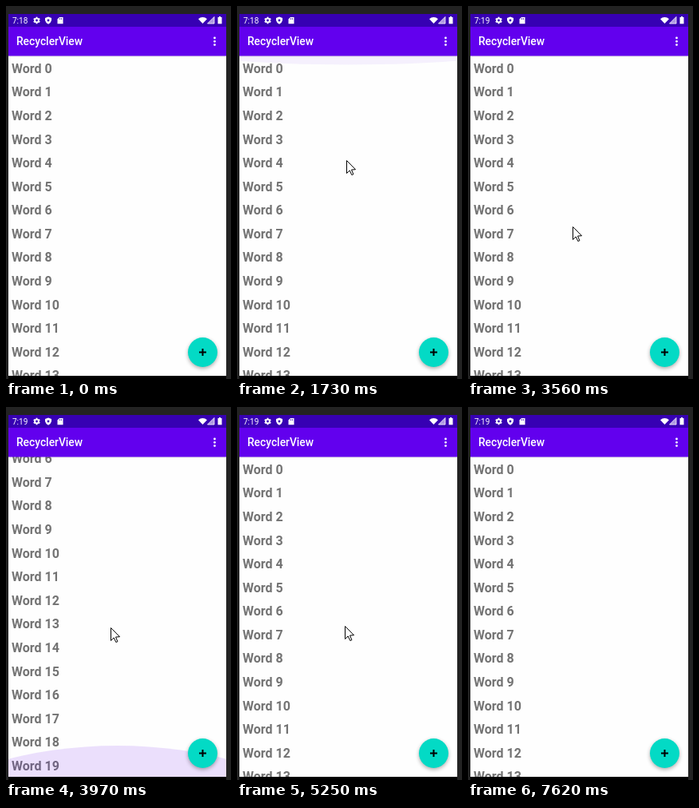
Recreate the animation shown at these times as an HTML page with a canvas. Size 282x467 px, loop 8000 ms.

```html
<!DOCTYPE html>
<html lang="en">
<head>
<meta charset="utf-8">
<title>RecyclerView</title>
<style>
  html, body { margin: 0; width: 100%; height: 100%; overflow: hidden; background: #222; }
  canvas { display: block; width: 282px; height: 467px; }
</style>
</head>
<body>
<canvas id="stage"></canvas>
<script>
const W = 282, H = 467, LOOP = 8000, STEP = 125;
const LEFT = 3, RIGHT = 276, TOP = 62, BOTTOM = 463, WIDTH = RIGHT - LEFT;
const ROW = 29.58, ROWS = 20, MAX_SCROLL = 191, FONT = 'Roboto, sans-serif';

const canvas = document.getElementById('stage');
const ctx = canvas.getContext('2d');
const dpr = window.devicePixelRatio || 1;
canvas.width = W * dpr;
canvas.height = H * dpr;
ctx.scale(dpr, dpr);

// Pointer glides: from, to (ms), then the place reached
const glides = [
  [500, 740, 144, 178], [880, 1730, 137, 193], [1850, 2210, 139, 197],
  [2350, 3140, 131, 270], [3560, 3560, 131, 276], [4470, 4710, 131, 274],
  [4860, 5380, 136, 274], [5680, 5830, 139, 260], [5980, 6220, 279, 443],
  [6510, 6510, 270, 425], [6650, 6650, 242, 319], [7350, 7350, 252, 371],
  [7500, 7500, 252, 425]
];
const visible = [[500, 6370], [6510, 6780], [7350, 7620]];

// List drags: from, to (ms), distance
const drags = [
  [880, 1240, MAX_SCROLL], [1360, 1730, -MAX_SCROLL],
  [3700, 3970, MAX_SCROLL], [4470, 4710, -140], [4860, 5100, 140 - MAX_SCROLL]
];

// Overscroll: growth from, to, fading from, to (ms), depth
const topPulls = [
  [1490, 1490, 2350, 2350, 11], [2350, 2850, 2990, 3140, 34], [5530, 5530, 5680, 5980, 31]
];
const bottomPulls = [[1240, 1240, 1360, 1360, 26], [3970, 3970, 4100, 4220, 39]];

// Progress 0..1 in visible steps; the first step shows at `from`, the last at `to`.
function progress(t, from, to) {
  if (t < from) return 0;
  if (t >= to) return 1;
  const gaps = Math.round((to - from) / STEP);
  return (Math.floor((t - from) / (to - from) * gaps) + 1) / (gaps + 1);
}

const easeOut = p => 1 - (1 - p) ** 2;

const sum = (items, f) => items.reduce((total, item) => total + f(item), 0);

const scrollAt = t => sum(drags, ([a, b, dist]) => dist * easeOut(progress(t, a, b)));

const pullAt = (pulls, t) =>
  sum(pulls, ([a, b, c, d, depth]) => depth * (progress(t, a, b) - progress(t, c, d)));

function pointerAt(t) {
  let x = 268, y = 589;
  for (const [from, to, tx, ty] of glides) {
    const p = progress(t, from, to);
    x += (tx - x) * p;
    y += (ty - y) * p;
  }
  return [Math.round(x), Math.round(y)];
}

function rect(color, x, y, w, h) {
  ctx.fillStyle = color;
  ctx.fillRect(x, y, w, h);
}

function disc(color, x, y, r) {
  ctx.fillStyle = color;
  ctx.beginPath();
  ctx.arc(x, y, r, 0, Math.PI * 2);
  ctx.fill();
}

function poly(color, ...pts) {
  ctx.fillStyle = color;
  ctx.beginPath();
  pts.forEach(([x, y]) => ctx.lineTo(x, y));
  ctx.closePath();
  ctx.fill();
}

function text(str, x, y, font, color) {
  ctx.font = font + ' ' + FONT;
  ctx.fillStyle = color;
  ctx.fillText(str, x, y);
}

function shadow(alpha, blur, dy) {
  ctx.shadowColor = `rgba(0,0,0,${alpha})`;
  ctx.shadowBlur = blur * dpr;
  ctx.shadowOffsetY = dy * dpr;
}

// A wide circle cap, squashed to the current depth
function glow(depth, edge, dir) {
  if (depth < 0.5) return;
  const r = WIDTH * 1.5, cap = r * (1 - Math.cos(Math.PI / 6));
  ctx.save();
  ctx.translate(LEFT + WIDTH / 2, edge);
  ctx.scale(1, dir * depth / cap);
  disc(`rgba(98,0,238,${Math.min(0.12, 0.02 + depth * 0.003)})`, 0, cap - r, r);
  ctx.restore();
}

function list(t) {
  const scroll = scrollAt(t);
  ctx.save();
  ctx.beginPath();
  ctx.rect(LEFT, TOP, WIDTH, BOTTOM - TOP);
  ctx.clip();
  rect('#fefefe', LEFT, TOP, WIDTH, BOTTOM - TOP);
  for (let i = 0; i < ROWS; i++) {
    text('Word ' + i, 7, Math.round(83.8 + i * ROW - scroll), 'bold 16px', '#737373');
  }
  glow(pullAt(topPulls, t), TOP + 0.5, 1);
  glow(pullAt(bottomPulls, t), BOTTOM, -1);
  ctx.restore();
}

function gear(x, y) {
  ctx.strokeStyle = '#fff';
  ctx.lineWidth = 2;
  for (let i = 0; i < 3; i++) {
    const a = i * Math.PI / 3 + Math.PI / 6, dx = 4.3 * Math.cos(a), dy = 4.3 * Math.sin(a);
    ctx.beginPath();
    ctx.moveTo(x - dx, y - dy);
    ctx.lineTo(x + dx, y + dy);
    ctx.stroke();
  }
  disc('#fff', x, y, 3.3);
  disc('#3700b3', x, y, 1.4);
}

function statusBar(t) {
  rect('#3700b3', LEFT, 10, WIDTH, 16);
  text(t < 2210 ? '7:18' : '7:19', 8, 21.5, '10px', '#fff');
  gear(38.5, 18);
  poly('#fff', [53, 13.5], [57, 15], [57, 18], [55.5, 21], [53, 22.8], [50.5, 21], [49, 18], [49, 15]);
  disc('#3700b3', 53, 18, 1.4);
  poly('#fff', [67, 14], [71.5, 14], [71.5, 22.3], [64.5, 22.3], [64.5, 16.5]);
  for (const x of [67, 69]) rect('#3700b3', x, 15.2, 0.8, 1.8);

  ctx.fillStyle = '#fff';
  ctx.beginPath();
  ctx.moveTo(246.5, 22);
  ctx.arc(246.5, 22, 8, -Math.PI * 0.74, -Math.PI * 0.26);
  ctx.fill();
  poly('rgba(255,255,255,.6)', [261, 13.5], [261, 22], [252.5, 22]);
  ctx.strokeStyle = '#fff';
  ctx.lineWidth = 0.8;
  ctx.stroke();
  rect('#fff', 265.5, 14, 5, 8.3);
  rect('#fff', 267, 13, 2, 1);
}

function appBar() {
  ctx.save();
  ctx.beginPath();
  ctx.rect(LEFT, 26, WIDTH, 41);
  ctx.clip();
  shadow(0.15, 2, 0.5);
  rect('#6200ee', LEFT, 26, WIDTH, TOP + 0.5 - 26);
  ctx.restore();
  text('RecyclerView', 13, 49, '500 13.8px', '#fff');
  for (const y of [40, 44.3, 48.6]) disc('#fff', 261.5, y, 1.4);
}

function fab() {
  const x = 246.5, y = 433.5;
  ctx.save();
  shadow(0.32, 5, 2);
  disc('#03dac5', x, y, 18.5);
  ctx.restore();
  rect('#000', x - 4.5, y - 1, 9, 2);
  rect('#000', x - 1, y - 4.5, 2, 9);
}

function pointer(t) {
  if (!visible.some(([from, to]) => t >= from && t < to)) return;
  const [x, y] = pointerAt(t);
  ctx.save();
  ctx.translate(x + 0.5, y + 0.5);
  poly('#fff', [0, 0], [0, 16], [3.7, 12.4], [6.3, 18], [8.4, 17.2], [6, 11.5], [11, 11.2]);
  ctx.strokeStyle = '#000';
  ctx.lineWidth = 1;
  ctx.stroke();
  ctx.restore();
}

function draw(now) {
  const t = now % LOOP;
  rect('#232323', 0, 0, W, H);
  rect('#000', LEFT, BOTTOM, WIDTH, H - BOTTOM);
  list(t);
  appBar();
  statusBar(t);
  fab();
  pointer(t);
}

let start;
function loop(now) {
  start ??= now;
  draw(Math.max(0, now - start));
  requestAnimationFrame(loop);
}
draw(0);
requestAnimationFrame(loop);
</script>
</body>
</html>
```
